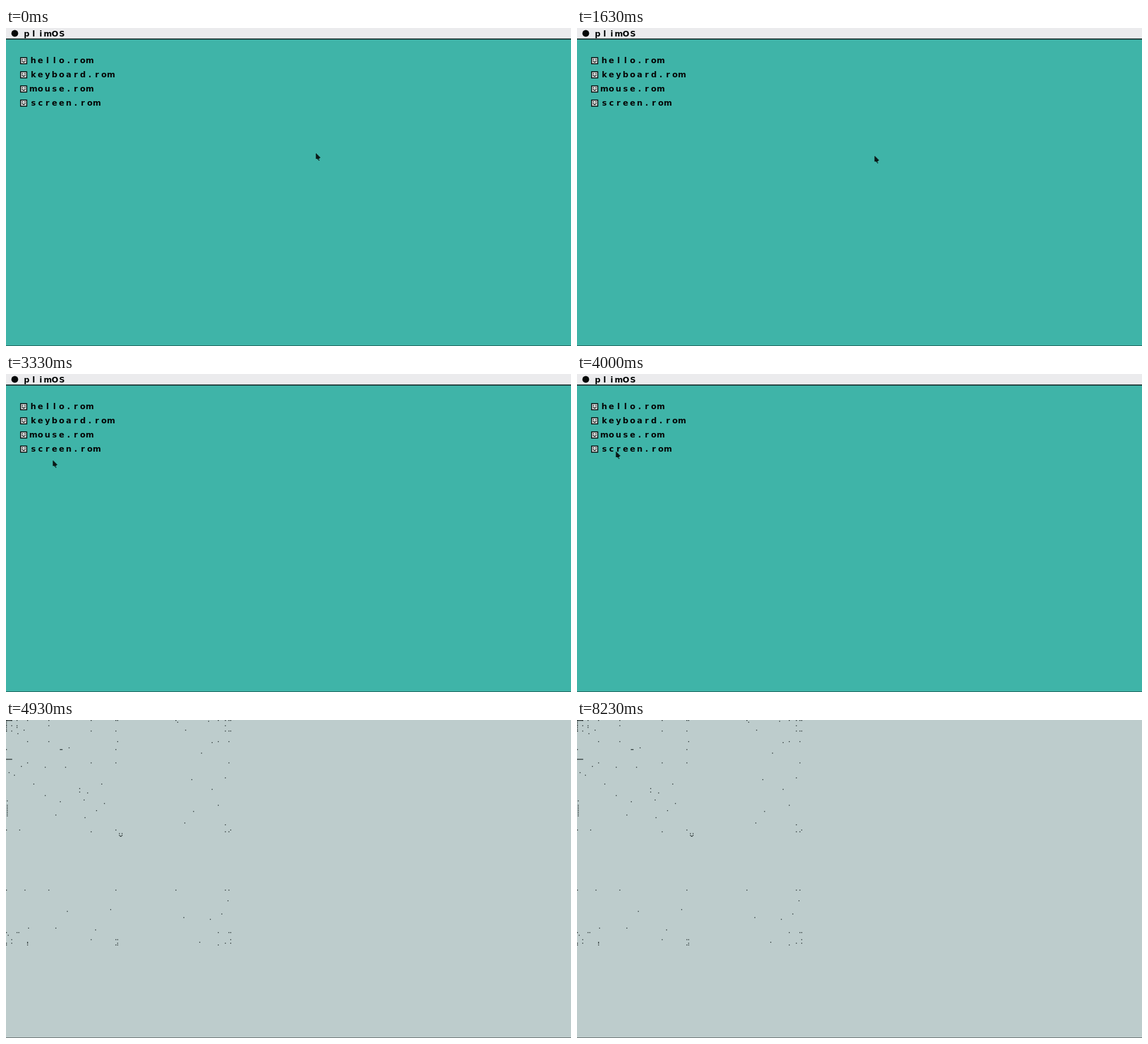
Write an HTML page with a canvas that moves like this. It is 998x561 px and loops after 8.4 s.

```html
<!DOCTYPE html>
<html lang="en">
<head>
<meta charset="utf-8">
<title>Desktop</title>
<style>
html, body { margin: 0; width: 100%; height: 100%; overflow: hidden; background: #3fb4a8; }
canvas { display: block; }
</style>
</head>
<body>
<canvas id="stage" width="998" height="561"></canvas>
<script>
const ctx = document.getElementById('stage').getContext('2d');
const LOOP = 8400, OPEN_AT = 4930;
const U = 998 / 640;            // one pixel of the 640 x 360 machine screen
const INK = '#050808';

// Pointer path: time, x, y
const path = [
  [0, 548, 222], [370, 548, 222], [1200, 539, 223], [1630, 526, 226],
  [2070, 444, 253], [2470, 197, 193], [2930, 168, 200], [3330, 83, 153],
  [3800, 70, 140], [4300, 69, 134], [LOOP, 69, 134]
];

function box(x, y, w, h, color) {
  ctx.fillStyle = color;
  ctx.fillRect(x * U, y * U, w * U, h * U);
}

function dot(x, y) {
  box(x, y, 1, 1, '#263030');
}

// One letter per cell of 8 machine pixels
function label(text, x, baseline) {
  ctx.fillStyle = INK;
  ctx.font = 'bold 14px "DejaVu Sans", sans-serif';
  ctx.textAlign = 'center';
  [...text].forEach((c, i) => ctx.fillText(c, x + (8 * i + 4) * U, baseline));
}

function face(x, y, color) {
  for (const dx of [0, 3]) for (const dy of [0, 2]) box(x + dx, y + dy, 1, 1, color);
  box(x + 1, y + 3, 2, 1, color);
}

function fileRow(name, i) {
  const y = 33 + 16 * i;
  box(16, y, 8, 8, INK);
  box(17, y + 1, 6, 6, '#d2d6d6');
  face(18, y + 2, INK);
  label(name, 27 * U, (y + 7) * U - .2);
}

// Smooth curve through the path points
function pointerAt(t) {
  const i = path.findIndex(p => p[0] > t) - 1;
  const a = path[i], b = path[i + 1], span = b[0] - a[0], s = (t - a[0]) / span;
  const slope = (j, k) => {
    const p = path[Math.max(j - 1, 0)], q = path[Math.min(j + 1, path.length - 1)];
    return (q[k] - p[k]) / (q[0] - p[0]) * span;
  };
  return [1, 2].map(k => a[k] + (b[k] - a[k]) * s * s * (3 - 2 * s) +
    slope(i, k) * s * (1 - s) ** 2 - slope(i + 1, k) * s * s * (1 - s));
}

function pointer(t) {
  const [x, y] = pointerAt(t).map(v => Math.round(v / U));
  for (let i = 0; i < 5; i++) box(x, y + i, i + 1, 1, INK);
  box(x, y + 5, 4, 1, INK);
  box(x + 2, y + 6, 1, 1, INK);
  box(x + 3, y + 7, 1, 1, INK);
}

function desktop(t) {
  box(0, 0, 640, 360, '#3fb4a8');
  box(0, 0, 640, 12, '#ebebed');
  box(0, 12, 640, 1, INK);
  ctx.fillStyle = INK;
  ctx.beginPath();
  ctx.arc(15.5, 9.5, 6, 0, 2 * Math.PI);
  ctx.fill();
  label('plimOS', 30.2, 15);
  ['hello.rom', 'keyboard.rom', 'mouse.rom', 'screen.rom'].forEach(fileRow);
  pointer(t);
}

// Sparse dots on a lattice of doubling steps, thicker towards the corner
function program() {
  let seed = 7;
  const rand = () => (seed = seed * 16807 % 2147483647) / 2147483647;
  const marks = [0];
  for (let k = 0; k < 6; k++) marks.push(6 << k);
  for (let k = 0; k < 4; k++) marks.push(256 - (2 << k));
  marks.push(124, 126);

  box(0, 0, 640, 360, '#bdcccc');
  for (const y of marks) for (const x of marks) {
    if (rand() < .35 || y === 0 || x + y < 20) dot(x, y);
  }
  for (let i = 0; i < 50; i++) {
    const spot = () => rand() < .7 ? 126 * rand() ** 1.5 : 192 + 62 * rand();
    dot(Math.floor(spot()), Math.floor(spot()));
  }
  for (let i = 0; i < 7; i++) {
    dot(0, 2 * i);
    dot(1, 96 + 2 * i);
    dot(i, 0);
    dot(i, 44);
  }
  for (let x = 61; x < 64; x++) dot(x, 33);
  face(128, 128, '#263030');
}

function frame(now) {
  const t = Math.floor(((now % LOOP) + 3.4) * .03) / .03;
  if (t < OPEN_AT) desktop(t); else program();
  ctx.fillStyle = 'rgba(0, 0, 0, .5)';
  ctx.fillRect(0, 560, 998, 1);
  requestAnimationFrame(frame);
}
requestAnimationFrame(frame);
</script>
</body>
</html>
```
